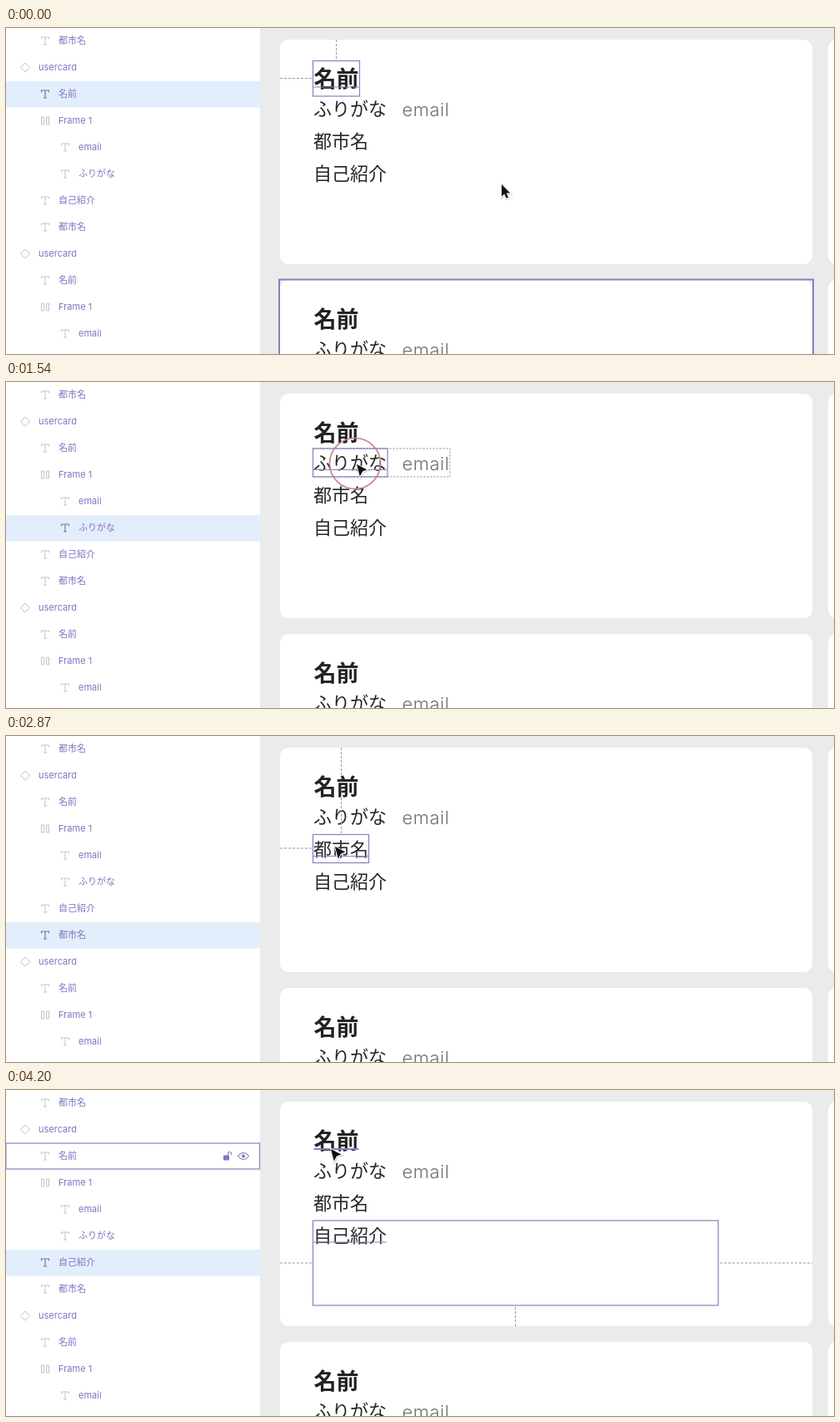
Write an HTML page that moves like this. It is 994 px wide and 392 px high and loops after 4.27 s.

```html
<!DOCTYPE html>
<html lang="ja">
<head>
<meta charset="utf-8">
<style>
html, body { margin: 0; height: 100%; overflow: hidden; background: #ebebeb; }
svg { display: block; }
text { font-family: Inter, "Noto Sans CJK JP", "Noto Sans CJK", sans-serif; white-space: pre; }
.label { font-size: 11px; fill: #8074c0; }
.cjk { font-weight: 500; }
.name { font-size: 27px; font-weight: 700; fill: #222; }
.body { font-size: 22px; font-weight: 300; fill: #262626; }
.mail { fill: #707070; letter-spacing: .5px; }
.line { fill: none; stroke: #897fc2; }
.dash { fill: none; stroke: #7ba3b8; stroke-dasharray: 3 2; }
.dots { fill: none; stroke: #8a82a8; stroke-dasharray: 2 2; }
.icon { fill: none; stroke: #c3c3cb; }
.icon.on { stroke: #7c74a6; stroke-width: 1.2; }
</style>
</head>
<body>
<svg id="stage" width="994" height="392" viewBox="0 0 994 392"></svg>
<script>
const LOOP = 4270, STEP = 70;
const stage = document.getElementById('stage');

const rows = [
  ['T', 1, '都市名'], ['diamond', 0, 'usercard'], ['T', 1, '名前'], ['frame', 1, 'Frame 1'],
  ['T', 2, 'email'], ['T', 2, 'ふりがな'], ['T', 1, '自己紹介'], ['T', 1, '都市名'],
  ['diamond', 0, 'usercard'], ['T', 1, '名前'], ['frame', 1, 'Frame 1'], ['T', 2, 'email'],
];

// Layers of a card: sidebar row, text, class, text x and width, baseline, box, constraint lines
const layers = {
  name: { row: 2, text: '名前', cls: 'name', x: 369.5, w: 54, base: 70.5, box: [368.5, 39.5, 56, 42.5],
    guides: 'M396.5 14V38M329 60.5H368' },
  kana: { row: 5, text: 'ふりがな', cls: 'body', x: 369, w: 88, base: 105, box: [368.5, 80, 89.5, 34], framed: true },
  email: { row: 4, text: 'email', cls: 'body mail', x: 475.5, w: 56, base: 105.5, box: [475, 80, 58, 34], framed: true },
  city: { row: 7, text: '都市名', cls: 'body', x: 369, w: 66, base: 144, box: [368.5, 118.5, 67, 34],
    guides: 'M402.5 14V118M329 135H368' },
  bio: { row: 6, text: '自己紹介', cls: 'body', x: 369, w: 88, base: 182.5, box: [368.5, 157, 486.5, 102],
    guides: 'M329 208H368M857 208H968M611.5 261V284' },
};

const selection = [[0, 'name'], [1400, 'kana'], [2240, 'email'], [2730, 'city'], [3290, 'bio']];
const hover = [[0, 'lower'], [350, 'upper'], [770, 'kana'], [1820, 'email'], [2380, 'upper'], [2520, 'city'],
  [3080, 'bio'], [3640, 'city'], [3850, 'kana'], [4060, 'name']];
const clicks = [[1400, 1610], [2170, 2380], [2660, 2800], [3290, 3430]];
const pointer = [[0, 595, 188], [280, 595, 188], [840, 424, 101], [980, 421, 99], [1610, 421, 99],
  [1890, 500, 101], [2030, 508, 100], [2310, 508, 100], [2450, 440, 133], [2590, 395, 133], [2870, 395, 133],
  [3150, 393, 172], [3430, 393, 172], [3780, 394, 114], [4200, 390, 71]];

const current = (track, t) => track.filter(k => k[0] <= t).pop()[1];

function pointerAt(t) {
  const i = pointer.findIndex(k => k[0] > t);
  if (i < 0) return pointer[pointer.length - 1].slice(1);
  const [a, b] = [pointer[i - 1], pointer[i]];
  const p = (t - a[0]) / (b[0] - a[0]), e = p * p * (3 - 2 * p);
  return [1, 2].map(n => a[n] + (b[n] - a[n]) * e);
}

const rect = (x, y, w, h, attrs) => `<rect x="${x}" y="${y}" width="${w}" height="${h}" ${attrs}/>`;
const path = (d, attrs) => `<path d="${d}" ${attrs}/>`;
const text = (x, y, cls, s) => `<text x="${x}" y="${y}" class="${cls}">${s}</text>`;
const move = (x, y, s) => `<g transform="translate(${x} ${y})">${s}</g>`;

const icons = {
  T: 'M-4.5 -2.2V-4.5H4.5V-2.2M0 -4.5V4.5M-2 4.5H2',
  diamond: 'M0 -5.5L5.5 0L0 5.5L-5.5 0Z',
  frame: 'M-4.5 -4.5H-1.5V4.5H-4.5ZM1.5 -4.5H4.5V4.5H1.5Z',
};

function sidebarRow([icon, depth, label], i, selected) {
  const x = 39 + depth * 24, y = i * 32;
  const cls = 'label' + (label.charCodeAt(0) > 255 ? ' cjk' : '');
  return (selected ? rect(0, y, 305, 31.5, 'fill="#e2eefb"') : '') +
    move(x - 16, y + 15.5, path(icons[icon], `class="icon${selected ? ' on' : ''}"`)) +
    text(x, y + 19, cls, label);
}

const rowOutline = i => move(0, i * 32,
  rect(0, 0, 304.5, 31, 'class="line" stroke-width="1.2"') +
  rect(261, 14.5, 7, 6, 'rx=".8" fill="#8074c0"') +
  path('M266.5 15V12.5a2 2 0 0 1 4 0V14', 'class="line" stroke-width="1.2"') +
  path('M278.5 15.5Q285 7.5 291.5 15.5Q285 23.5 278.5 15.5Z', 'class="line" stroke-width="1.1"') +
  '<circle cx="285" cy="15.5" r="2" fill="#8074c0"/>');

const underline = (l, width) => path(`M${l.x} ${l.base + .5}h${l.w}`, `class="line" stroke-width="${width}"`);

const card = y => move(0, y,
  rect(329, 14, 639, 270, 'rx="10" fill="#fff"') +
  rect(987, 14, 639, 270, 'rx="10" fill="#fff"') +
  Object.values(layers).map(l => text(l.x, l.base, l.cls, l.text)).join(''));

function selectionMarks(l) {
  return (l.framed ? rect(368.5, 80, 164.5, 34, 'class="dots"') : '') +
    (l.guides ? path(l.guides, 'class="dash"') : '') +
    rect(...l.box, 'class="line" stroke-width="1.2"') + underline(l, 1);
}

function cursor(t) {
  const arrow = t < 350
    ? 'M0 0V14.5L3.3 11.5L5.6 16.8L8 15.8L5.7 10.6H10.2Z'
    : 'M0 0L12.5 6.6L7 8.6L3.8 14.5Z';
  return move(...pointerAt(t),
    path(arrow, 'transform="translate(.5 1)" fill="none" stroke="#0002" stroke-width="3"') +
    path(arrow, 'fill="#111" stroke="#fff" stroke-width="1.6" paint-order="stroke"'));
}

function scene(t) {
  const selected = layers[current(selection, t)];
  const over = current(hover, t), hovered = layers[over];
  let s = rect(0, 0, 994, 392, 'fill="#ebebeb"') + card(0) + card(289) +
    rect(0, 0, 305, 392, 'fill="#fff"') +
    rows.map((r, i) => sidebarRow(r, i, i === selected.row)).join('') +
    selectionMarks(selected);
  if (!hovered) {
    s += rect(328, over === 'upper' ? 13.5 : 302.5, 641, 271, 'class="line" stroke-width="2"');
    if (over === 'upper') s += rowOutline(1);
  } else if (hovered !== selected) {
    s += underline(hovered, 1.8) + rowOutline(hovered.row);
  }
  if (clicks.some(([from, to]) => t >= from && t < to)) {
    const [x, y] = pointerAt(t);
    s += `<circle cx="${x - 2}" cy="${y - 1}" r="30.5" fill="none" stroke="#c58488" stroke-width="1.6"/>`;
  }
  return s + cursor(t);
}

let shown = -1;
function draw() {
  const t = Math.floor(performance.now() % LOOP / STEP) * STEP;
  if (t !== shown) stage.innerHTML = scene(shown = t);
  requestAnimationFrame(draw);
}
draw();
</script>
</body>
</html>
```
